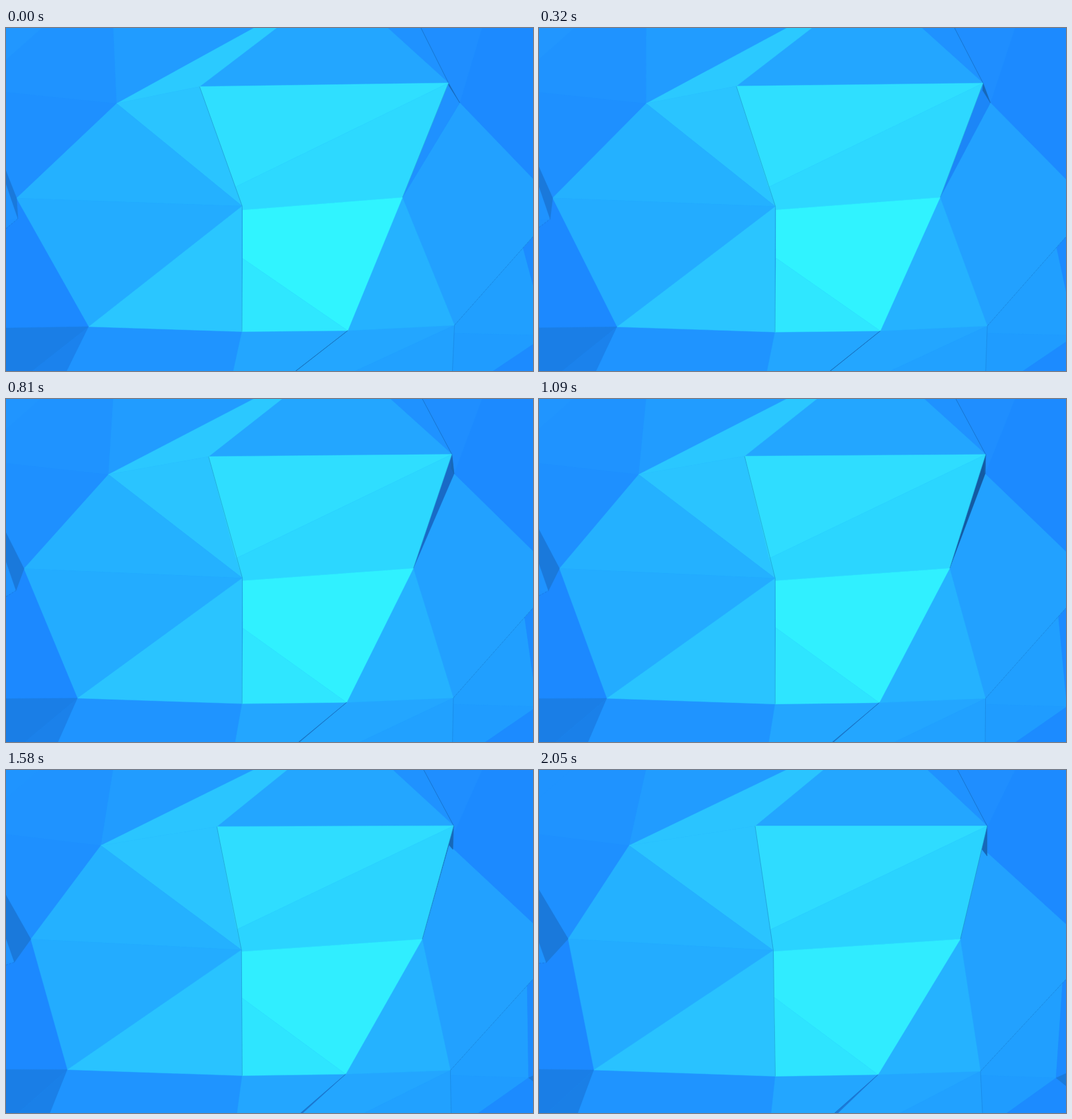
Animation of 795x518 px, one loop 2.12 s. Source, as an HTML page:

```html
<!DOCTYPE html>
<html lang="en">
<head>
<meta charset="utf-8">
<title>Shifting facets</title>
<style>
  html, body { margin: 0; width: 100%; height: 100%; overflow: hidden; background: #1e91ff; }
  svg { display: block; width: 100%; height: 100%; }
</style>
</head>
<body>
<svg id="stage" viewBox="0 0 795 518" preserveAspectRatio="none"></svg>
<script>
const LOOP = 2120, STEP = 70, LAST = 30;

// Each point: start x, y, end x, y, optional sideways bend at mid-travel.
const inner = {
  A: [167, 114, 136, 114],
  B: [292, 88.5, 326, 84.5],
  C: [356.3, 269, 353.5, 272.5, 1.5],
  D: [667.5, 83, 676, 84.5, 1.8],
  E: [598, 256, 635.5, 255.5, 1.5],
  F: [515.5, 457, 511.5, 460],
  G: [356, 458.5, 356.5, 462.5],
  H: [125, 451, 83, 453],
  I: [16, 257, 44, 255],
  J: [684.5, 113, 663, 113],
  K: [676.5, 449, 666, 455, 2.7],
  K2: [676.5, 461, 666, 461, 2.7],
  N: [357, 275, 354, 274, 1.3],
  P: [780, 332, 790, 320, -2],
  Q: [815.5, 464, 780, 465],
  S: [346, 240, 349, 241],
  V: [357, 348, 354.5, 343, 1.3],
  X: [668, 87, 676, 130]
};
const rim = {
  o: [0, 0, 0, 0],
  a: [162, 0, 161.5, 0],
  b: [374, 0, 373, 0],
  c: [408, 0, 428.5, 0],
  d: [576, 0, 586, 0],
  e: [626, 0, 631.5, 0],
  f: [718, 0, 718, 0],
  g: [795, 0, 795, 0],
  h: [795, 228, 795, 233],
  i: [795, 315, 795, 316],
  j: [835.5, 455, 800, 456],
  k: [835.5, 478, 800, 481],
  l: [820, 288, 820, 288],
  m: [820, 518, 820, 518],
  n: [735, 518, 706, 518],
  p: [673.5, 518, 669, 518, 2],
  q: [527, 518, 545, 518],
  r: [437, 518, 446, 518, 1],
  r2: [437.5, 518, 451, 518],
  s: [343, 518, 350.5, 518],
  t: [92, 518, 59, 518],
  u: [40, 518, 12, 518],
  v: [0, 518, 0, 518],
  w: [0, 453, 0, 452],
  x: [0, 216, 0, 181],
  y: [18, 288, 11, 291],
  z: [0, 235, 0, 260],
  z2: [0, 290, 0, 290],
  z3: [0, 303, 0, 292],
  ca: [54, 0, 48, 0],
  cb: [0, 48, 0, 42],
  cc: [0, 97, 0, 97]
};
const points = { ...inner, ...rim };

// Back to front: "colour[-end colour] corners".
const faces = [
  "1f93ff o a A I y z2",
  "1e90ff cc A I x",
  "2197ff-1f93ff o ca cb",
  "219cff a b A",
  "1c89ff z3 y I H w",
  "1a7ee6 w H u v",
  "1b82ed-1a7fe6 H t u",
  "1f94ff H G s t",
  "23a6ff G F r s",
  "23a6ff F K q r",
  "21a1ff K p q",
  "209fff K P Q K2",
  "1f9cff K2 Q n p",
  "1c8bff Q k m n",
  "1c8bff P l j Q",
  "1a7bdc Q j k",
  "1c8aff f g h J D",
  "1f8eff e f J D",
  "1f92ff d e D",
  "23a6ff c d D B",
  "22a1ff J h i K E",
  "25b2ff E K F",
  "sliver D J E",
  "1768b8 D J X",
  "2bcaff-2ac4ff b c B A",
  "2ac4ff A B C",
  "24b1ff A C I",
  "23acff I C H",
  "2ac6ff-29c2ff H C G",
  "2fdfff-2fdcff B D S",
  "2dd9ff-2ad3ff S D E N C",
  "30f4ff-30ecff N E F V",
  "2fe7ff-2ee4ff V F G",
  "1a79db x I y z",
  "1a72bd-1c7ad8 F r r2"
];
// Hairlines: "opacity dash corners".
const creases = [
  ".55 none e D", ".4 none B C", ".35 none C G",
  ".35 4,1 K i", ".25 none K p", ".3 3,2 z3 y",
  ".25 none D E", ".3 none F r"
];

const stage = document.getElementById("stage");
function add(tag, attrs) {
  const node = document.createElementNS("http://www.w3.org/2000/svg", tag);
  for (const key in attrs) node.setAttribute(key, attrs[key]);
  return stage.appendChild(node);
}

const facets = faces.map(spec => {
  const [paint, ...corners] = spec.split(" ");
  const node = add("polygon", { "stroke-width": .5, "stroke-linejoin": "bevel" });
  return { node, corners, paint: paint.split("-") };
});
const lines = creases.map(spec => {
  const [opacity, dash, ...corners] = spec.split(" ");
  const node = add("polyline", {
    fill: "none", stroke: "#124f91", "stroke-width": .8,
    "stroke-opacity": opacity, "stroke-dasharray": dash
  });
  return { node, corners };
});

const lerp = (a, b, u) => a + (b - a) * u;
function mix(from, to, u) {
  const channel = (hex, i) => parseInt(hex.slice(i, i + 2), 16);
  return `rgb(${[0, 2, 4].map(i => Math.round(lerp(channel(from, i), channel(to, i), u)))})`;
}
function locate(name, u) {
  const [x0, y0, x1, y1, bend = 0] = points[name];
  const x = lerp(x0, x1, u) + 4 * bend * u * (1 - u);
  return `${x.toFixed(2)},${lerp(y0, y1, u).toFixed(2)}`;
}
// The gap on the right darkens as it narrows.
function sliverColor(u) {
  if (u < .17) return mix("1f91ff", "1c86f7", u / .17);
  if (u < .4) return mix("1c86f7", "196ac6", (u - .17) / .23);
  return mix("196ac6", "1459a0", Math.min(1, (u - .4) / .14));
}

// Two of the steps are cut short.
function progress(t) {
  const skipped = (t >= 320 ? 30 : 0) + (t >= 1980 ? 20 : 0);
  return Math.min(LAST, Math.floor((t + skipped) / STEP)) / LAST;
}

function draw(t) {
  const u = progress(t);
  for (const { node, corners, paint } of facets) {
    const color = paint[0] === "sliver" ? sliverColor(u) : mix(paint[0], paint[1] || paint[0], u);
    node.setAttribute("points", corners.map(name => locate(name, u)).join(" "));
    node.setAttribute("fill", color);
    node.setAttribute("stroke", color);
  }
  for (const { node, corners } of lines) {
    node.setAttribute("points", corners.map(name => locate(name, u)).join(" "));
  }
}

const start = performance.now();
function tick() {
  draw((performance.now() - start) % LOOP);
  requestAnimationFrame(tick);
}
tick();
</script>
</body>
</html>
```
